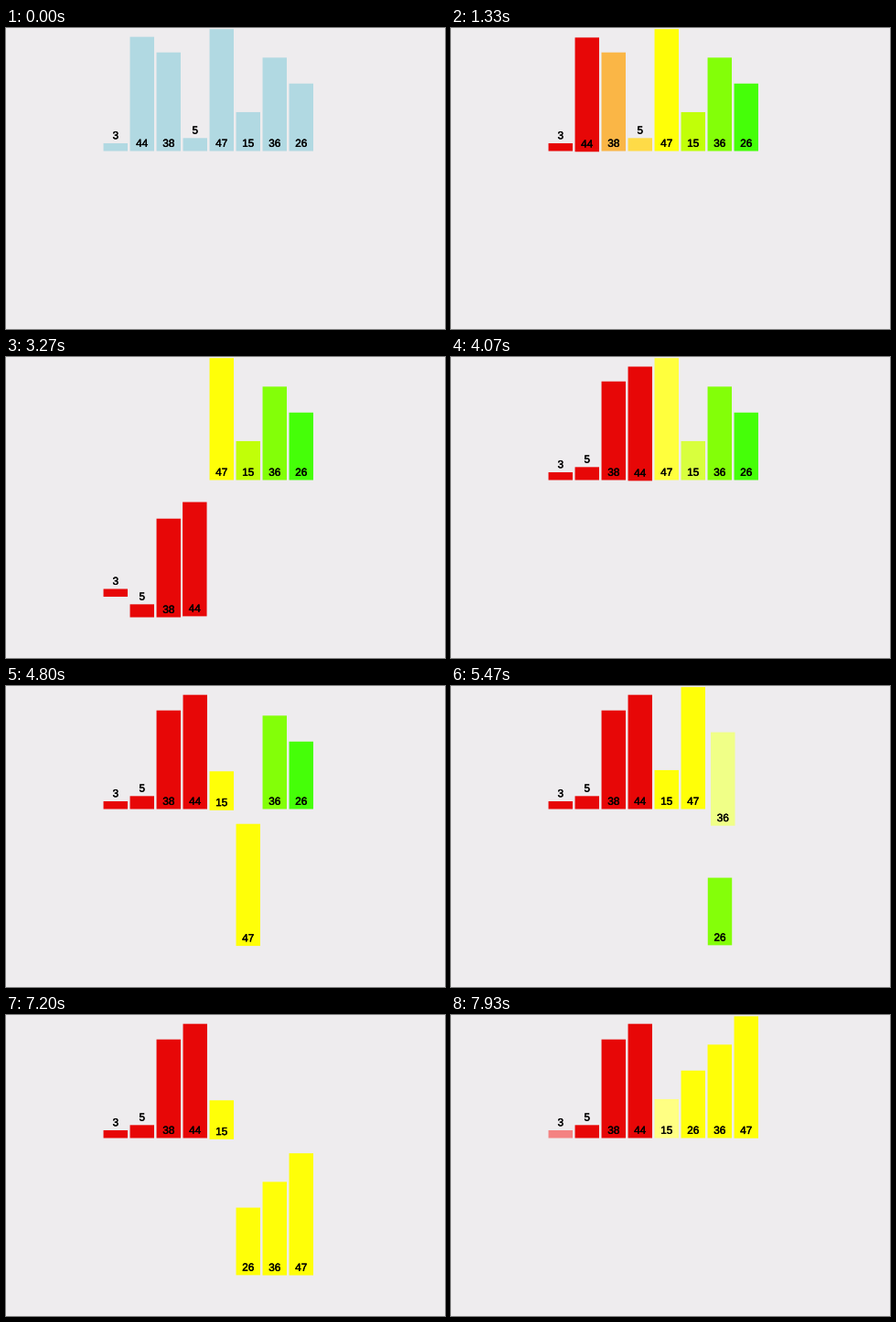
These frames come from a looping animation (480x329 px, 8000 ms). A matplotlib script:

```python
from colorsys import hsv_to_rgb

import numpy as np
import matplotlib.pyplot as plt
from matplotlib.animation import FuncAnimation
from matplotlib.patches import Rectangle
from matplotlib.patheffects import withStroke

W, H, DPI = 480, 329, 100
FRAMES, LOOP = 400, 8000
TICK = 1000 / 15  # the picture moves on 15 times a second
VALUES = [3, 44, 38, 5, 47, 15, 36, 26]
N = len(VALUES)

LEFT, PITCH, BAR_W = 106.55, 29.0, 26.45
BASE, DROP, UNIT = 134.5, 150.0, 2.837
LABEL_GAP = 4.7
CUT = 0.87  # each move is cut short by the next one

BLUE = np.array([177, 217, 226]) / 255
# pace of the sort: time in ms and step number
PACE = [(0, 0.82), (2600, 13.94), (4067, 21.52), (5467, 28.36), (8000, 41.1)]


def ease(t):
    return 4 * t ** 3 if t < 0.5 else 1 - 4 * (1 - t) ** 3


def color(i):
    return np.array(hsv_to_rgb(15 * i / 360, 0.97, min(1, 0.905 + 0.03 * i)))


def light(i):
    rgb = color(i)
    return np.minimum(rgb + 0.57, min(1, rgb.max() + 0.06))


def build_states():
    """Rows of (x, y, r, g, b) per bar, one table for every sort step."""
    state = np.zeros((N, 5))
    state[:, 0] = LEFT + PITCH * np.arange(N)
    state[:, 2:] = BLUE
    states = [state.copy()]
    order, group = list(range(N)), list(range(N))

    def snap():
        states.append(state.copy())

    def mark(*runs):
        for run in runs:
            if run:
                state[run[0], 2:] = light(group[run[0]])

    def merge(lo, mid, hi):
        left, right, out = order[lo:mid], order[mid:hi], []
        joined = group[left[0]]
        mark(left, right)
        snap()
        while left or right:
            from_left = not right or (
                left and VALUES[left[0]] <= VALUES[right[0]])
            bar = (left if from_left else right).pop(0)
            group[bar] = joined
            state[bar] = (LEFT + PITCH * (lo + len(out)), DROP, *color(joined))
            out.append(bar)
            mark(left, right)
            snap()
        for bar in out:
            state[bar, 1] = 0
            snap()
        order[lo:hi] = out

    def sort(lo, hi):
        if hi - lo > 1:
            mid = (lo + hi) // 2
            sort(lo, mid)
            sort(mid, hi)
            merge(lo, mid, hi)

    state[:, 2:] = [color(i) for i in range(N)]
    snap()
    sort(0, N)
    return states


goals = build_states()
starts = [goals[0]]
for goal in goals[:-1]:
    starts.append(starts[-1] + (goal - starts[-1]) * ease(CUT))

fig = plt.figure(figsize=(W / DPI, H / DPI), dpi=DPI, facecolor="#eeecee")
ax = fig.add_axes([0, 0, 1, 1])
ax.set_xlim(0, W)
ax.set_ylim(H, 0)
ax.axis("off")

bars, labels = [], []
for i, value in enumerate(VALUES):
    bar = Rectangle((0, 0), BAR_W, value * UNIT, lw=0, zorder=2 + i)
    bar.set_snap(False)
    bars.append(ax.add_patch(bar))
    labels.append(ax.text(
        0, 0, str(value), family="Liberation Sans", color="black",
        fontsize=11.8 * 72 / DPI, ha="center", va="baseline", zorder=2.5 + i,
        path_effects=[withStroke(linewidth=0.25, foreground="black")]))


def draw(frame):
    time = (frame * LOOP / FRAMES + 15) // TICK * TICK
    step = np.interp(time, *zip(*PACE))
    k = min(int(step), len(goals) - 1)
    now = starts[k] + (goals[k] - starts[k]) * ease(CUT * (step - k))
    for bar, label, value, (x, y, *rgb) in zip(bars, labels, VALUES, now):
        height = value * UNIT
        foot = BASE + y
        bar.set_xy((x, foot - height))
        bar.set_facecolor(np.clip(rgb, 0, 1))
        rise = height if height < 20 else 0
        label.set_position((x + BAR_W / 2, foot - rise - LABEL_GAP))
    return bars + labels


anim = FuncAnimation(fig, draw, frames=FRAMES, interval=LOOP // FRAMES,
                     init_func=lambda: draw(0), repeat=True, repeat_delay=0)
plt.show()
```
